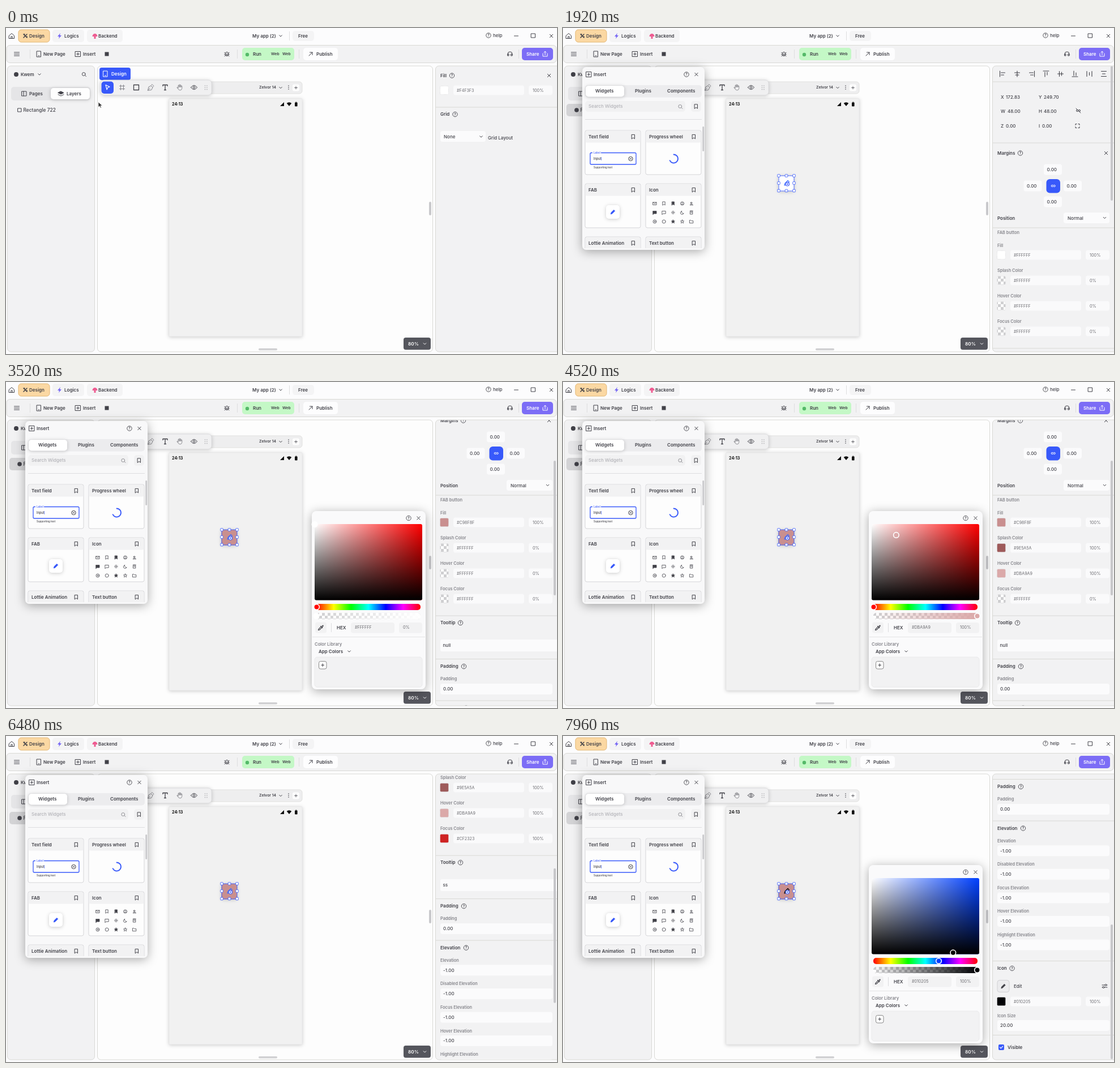
An HTML page for the animation above (8000 ms loop, 973x576 px).

```html
<!DOCTYPE html>
<html lang="en">
<head>
<meta charset="utf-8">
<title>App builder</title>
<style>
html, body { margin: 0; width: 100%; height: 100%; overflow: hidden; background: #fcfcfd; }
svg { display: block; width: 973px; height: 576px; font-family: Inter, sans-serif; }
text { white-space: pre; }
.shadow { filter: drop-shadow(0 3px 9px #0005); }
.soft { filter: drop-shadow(0 1px 3px #0003); }
</style>
</head>
<body>
<svg id="stage" viewBox="0 0 973 576"></svg>
<script>
const INK = '#414148', GREY = '#85858b', BLUE = '#3859fa', PANEL = '#f2f2f3', LINE = '#d9d9d5';

const text = (x, y, str, size = 8, color = INK, weight = 600, id = '') =>
  `<text ${id && `id="${id}"`} x="${x}" y="${y + size * .36}" font-size="${size}" fill="${color}" font-weight="${weight}">${str}</text>`;
const box = (x, y, w, h, r, fill, stroke = 'none', more = '') =>
  `<rect x="${x}" y="${y}" width="${w}" height="${h}" rx="${r}" fill="${fill}" stroke="${stroke}" ${more}/>`;
const icon = (x, y, d, color = INK, width = 1, fill = 'none') =>
  `<path transform="translate(${x} ${y})" d="${d}" fill="${fill}" stroke="${color}" stroke-width="${width}" stroke-linecap="round" stroke-linejoin="round"/>`;
const solid = (x, y, d, color = INK) => icon(x, y, d, 'none', 0, color);
const dot = (x, y, r, fill, stroke = 'none', width = 1, id = '') =>
  `<circle ${id && `id="${id}"`} cx="${x}" cy="${y}" r="${r}" fill="${fill}" stroke="${stroke}" stroke-width="${width}"/>`;
const group = (id, body, more = '') => `<g id="${id}" ${more}>${body}</g>`;
const rule = y => box(759, y - .5, 214, 1, 0, LINE);
const bar = (x, y = 46) => box(x, y - 8, 1, 16, 0, '#dddddf');
const help = (x, y) => dot(x, y, 4.2, 'none', INK, .9) + text(x - 1.8, y, '?', 6.5, INK, 600);
const cross = (x, y) => icon(x, y, 'M-2.7-2.7l5.4 5.4M2.7-2.7l-5.4 5.4');
const chevron = (x, y, color) => icon(x, y, 'M-2.3-1.2l2.3 2.3l2.3-2.3', color);

const D = {
  plus: 'M-2.4 0h4.8M0-2.4v4.8',
  plusBox: 'M-4.5-4.5h9v9h-9zM-2.3 0h4.6M0-2.3v4.6',
  phone: 'M-3.5-5h7v10h-7zM-1 3h2',
  bookmark: 'M-2.5-3.6h5v7.4l-2.5-2l-2.5 2z',
  pencil: 'M-3.5 3.5l.6-2.4l4.7-4.7l1.8 1.8l-4.7 4.7z',
  search: 'M2.7 0a2.9 2.9 0 1 0-5.8 0a2.9 2.9 0 1 0 5.8 0M2 2l2 2',
  arrow: 'M0 0v9l2.3-2l1.5 3.2l1.6-.8l-1.5-3.1h3z',
  bolt: 'M1-5l-5 6h3l-1 4l5-6h-3z',
  layers: 'M0-4l5 2.5l-5 2.5l-5-2.5zM-5 1.5l5 2.5l5-2.5',
  square: 'M-4.5-4.5h9v9h-9z',
  link: 'M-1 1.5h-1a1.5 1.5 0 0 1 0-3h1M1-1.5h1a1.5 1.5 0 0 1 0 3h-1M-1 0h2'
};

const header = () =>
  icon(10, 14, 'M-4.5-.5l4.5-4l4.5 4v5h-9zM-1.2 4.5v-3.5h2.4v3.5') +
  box(22, 3, 55, 22, 5, '#fbd8a3', '#e3b775') + icon(34, 14, 'M-3 3l6-6M-3-3l6 6M-3-3l2 0M3 3v-2', INK, 1.5) + text(41, 14, 'Design') +
  box(82, 3, 56, 22, 5, '#f4f4f5') + solid(95, 14, D.bolt, '#7465f4') + text(103, 14, 'Logics') +
  box(143, 3, 63, 22, 5, '#f4f4f5') + solid(157, 14, 'M-4.5 1a4.5 5 0 0 1 9 0zM-1.5 1h3v4h-3z', '#ee5d92') + text(163, 14, 'Backend') +
  text(435, 14, 'My app (2)') + chevron(485, 14) + bar(500, 14) +
  box(506, 5, 38, 18, 5, '#f4f4f5') + text(516, 14, 'Free') +
  help(852, 13) + text(860, 13, 'help', 8, INK, 500) +
  icon(901, 14, 'M-3.5 0h7') + icon(931, 13.5, 'M-3.5-3.5h7v7h-7z') + cross(963, 14);

const toolbar = () =>
  box(1, 30.5, 971, 31, 6, PANEL, LINE) +
  icon(19, 46, 'M-4.5-3h9M-4.5 0h9M-4.5 3h9') + bar(42) +
  icon(58, 46, D.phone) + text(66, 46, 'New Page') +
  icon(127, 46, D.plusBox) + text(136, 46, 'Insert') +
  box(174.5, 42.5, 7, 7, 0, INK) +
  icon(390, 46, 'M-2.5-1a2.5 2.5 0 0 1 5 0v2a2.5 2.5 0 0 1-5 0zM-4.2-2.5l1.7 1M4.2-2.5l-1.7 1M-4.2 0.5h1.7M4.2 .5h-1.7M-4 3.5l2-1.2M4 3.5l-2-1.2M-1 0h2M-1 1.8h2') +
  bar(408) + box(417, 35, 92, 22, 5, '#c4f8c6') + dot(426, 47, 3.2, '#55ba69') + text(436, 46, 'Run') +
  text(468, 46, 'Web', 6.8) + text(488, 46, 'Web', 6.8) + bar(517) +
  box(525, 35, 61, 22, 5, '#fdfdfe') + icon(538, 46, 'M-3 3l6-6M-1.5-3h4.5v4.5') + text(548, 46, 'Publish') +
  icon(890, 46, 'M-4 2v-2a4 4 0 0 1 8 0v2M-4 0h2v3h-2zM2 0h2v3h-2z') + bar(905) +
  box(911, 35, 55, 22, 5, '#7c6df6') + text(919, 46, 'Share', 8, '#fff') +
  icon(952, 46, 'M-4-1v5h8v-5M0 1.5v-6M-2-2.8l2-2l2 2', '#fff');

const leftPanel = () =>
  box(2.5, 67, 154, 505, 6, PANEL, LINE) + dot(18, 82, 4, INK) + text(26, 82, 'Kwem') + chevron(59, 82) + icon(137.5, 81.5, D.search) +
  box(9, 104, 140, 24, 5, '#e5e5e7') + box(79, 106, 69, 20, 5, '#fefefe', 'none', 'class="soft"') +
  icon(32, 116, 'M-4-4h8v8h-8zM-1-4v8') + text(41, 116, 'Pages') +
  icon(97, 116, D.layers) + solid(97, 116, 'M0-4l5 2.5l-5 2.5l-5-2.5z') + text(107, 116, 'Layers') +
  group('rectLayer', icon(24, 145, 'M-3-3h6v6h-6z') + text(30.5, 145, 'Rectangle 722', 8.4, INK, 500)) +
  group('fabLayer', box(6, 134, 147, 22, 5, '#d3d3d5') + dot(24, 145, 3.8, INK) + text(30.5, 145, 'FAB', 8.4, INK, 500));

const workspace = () =>
  box(161.5, 67, 592, 505, 6, '#fdfdfd', LINE) +
  box(288, 95, 235, 21, 5, '#eeeeef', '#e1e1df') + text(447, 105, 'Zelvor 14', 6.8) + chevron(485, 105.5) +
  [-3, 0, 3].map(d => dot(499, 105 + d, .8, INK)).join('') + box(506, 99.5, 12, 12, 3, '#fdfdfd') + icon(512, 105.5, D.plus, INK, .8) +
  box(288, 125, 235, 420, 1, '#f1f1f1', '#e3e3e5', 'class="soft" stroke-width=".6"') +
  text(293, 134, '24:13', 7.2, '#111', 700) + solid(488, 134.5, 'M-4 3.5h7v-7z', '#111') +
  solid(500, 134.5, 'M-4.3-1.5a6.2 6.2 0 0 1 8.6 0l-4.3 5z', '#111') + box(510, 131.5, 4.6, 7, 1, '#111') + box(511.2, 130.6, 2.2, 1, 0, '#111') +
  box(165, 70, 55, 22, 4, BLUE) + icon(175.5, 81, D.phone, '#fff') + text(186, 81, 'Design', 8, '#fff') +
  box(167, 92, 196, 26.5, 6, '#f0f0f1', '#dddddf', 'class="soft"') + box(168.5, 94.5, 21.5, 21.5, 5, BLUE) +
  icon(176, 100.5, 'M0 0l7 3.5l-3.4 1.3l-1.5 3.6z', '#fff', 1.2) +
  icon(205, 105, 'M-2.5-4.5v9M2.5-4.5v9M-4.5-2.5h9M-4.5 2.5h9', GREY) + icon(230, 105, D.square, INK, 1.3) +
  icon(255.5, 105, 'M-5 5l1.5-6l4-2l3 3l-2 4zM1-4l1.5-1.5l3 3l-1.5 1.5M-5 5l4-4', GREY) +
  icon(281, 105, 'M-4-2.5v-2h8v2M0-4.5v9M-1.5 4.5h3', INK, 1.3) +
  icon(306.5, 105, 'M-2.5 1v-4.5q1-1 1.7 0v3v-4.2q1-1 1.7 0v4.2v-3.5q1-1 1.7 0v3.5v-2q1-1 1.7 0v4q-.5 3.5-3.5 3.5q-2.5 0-5.5-5q.7-1.2 2.2 1', GREY, .9) +
  icon(332, 105, 'M-5.5 0q5.5-7.5 11 0q-5.5 7.5-11 0M1.8 0a1.8 1.8 0 1 0-3.6 0a1.8 1.8 0 1 0 3.6 0') +
  [0, 1, 2, 3, 4, 5].map(i => dot(351.5 + i % 2 * 3.4, 102 + (i >> 1) * 3.3, .8, '#a5a5a9')).join('') +
  box(747, 307, 4, 24, 2, '#c9c9cc') + box(446, 566, 33, 3.5, 1.7, '#d0d0d2') +
  box(702, 547, 48, 21.5, 4, '#55565d') + text(710, 558, '80%', 8.2, '#fff') + chevron(739.5, 558, '#fff');

const pen = color => `<g id="fabIcon" stroke="${BLUE}">${icon(395, 274, 'M-4 4l1-3.5l5-5l2.4 2.4l-5 5z', 'inherit', 1.2).replace('stroke="inherit"', '')}</g>`;
const fab = () => {
  let out = box(380.5, 261, 27.5, 27.5, 3, '#fff', 'none', 'id="fabFill" class="soft"') + pen() +
    dot(396.3, 275.8, 3.2, '#fff', BLUE, 1.2) + dot(396.3, 275.8, 1.2, BLUE) + box(381, 261, 27, 27, 0, 'none', BLUE, 'stroke-width=".9"');
  for (const x of [381, 394.5, 408]) for (const y of [261, 274, 287.5])
    if (x !== 394.5 || y !== 274) out += box(x - 2.3, y - 2.3, 4.6, 4.6, .6, '#fff', BLUE, 'stroke-width=".8"');
  return out;
};

const card = (x, y, title) =>
  box(x, y, 98, 78, 3, '#fdfdfd', '#d5d5d8') + box(x + .5, y + .5, 97, 21, 3, PANEL) +
  text(x + 6, y + 11, title, 8) + icon(x + 85, y + 11, D.bookmark);

const smallIcons = () => {
  const shapes = ['M-3-2h6v4.5h-6zM-3-2l3 2.5l3-2.5', 'M-2-3h4v6l-2-1.6l-2 1.6z', 'M-2-3h4v6l-2-1.6l-2 1.6z', 'M3 0a3 3 0 1 0-6 0a3 3 0 1 0 6 0M-2 2q2-2 4 0M-1-1h2', 'M-2.5 2.5q2.5-3 5 0zM-1-2h2v2h-2z',
    'M-3-2.5h6v4.5h-4.5l-1.5 1.5z', 'M-3-2.5h6v4.5h-4.5l-1.5 1.5z', 'M1.4 0a1.4 1.4 0 1 0-2.8 0a1.4 1.4 0 1 0 2.8 0M0-3v.4M0 3v-.4M-3 0h.4M3 0h-.4M-2-2l.2.2M2 2l-.2-.2M-2 2l.2-.2M2-2l-.2.2', 'M-1-2.5a3 3 0 1 0 3.5 4a3 3 0 0 1-3.5-4', 'M-2-2h4v5h-4zM-2.5-3h5M-1 0h2',
    'M3 0a3 3 0 1 0-6 0a3 3 0 1 0 6 0M1 0a1 1 0 1 0-2 0a1 1 0 1 0 2 0', 'M3 0a3 3 0 1 0-6 0a3 3 0 1 0 6 0', 'M0-3l.9 2h2.1l-1.6 1.5l.6 2.3l-2-1.3l-2 1.3l.6-2.3l-1.6-1.5h2.1z', 'M0-3l.9 2h2.1l-1.6 1.5l.6 2.3l-2-1.3l-2 1.3l.6-2.3l-1.6-1.5h2.1z', 'M-3-2.3h2l1 1h3v4h-6z'];
  return shapes.map((d, i) => icon(162 + i % 5 * 16.2, 310 + Math.floor(i / 5) * 16, d, INK, .8, [2, 5, 12].includes(i) ? INK : 'none')).join('');
};

const insertPanel = () =>
  box(34, 69, 216, 323, 7, '#f8f8f9', 'none', 'class="shadow"') +
  icon(45.5, 82, D.plusBox) + text(54, 82, 'Insert') + help(218, 82) + cross(235.5, 82) +
  box(39, 101, 206, 21.5, 5, '#ececee') + box(40, 102, 68, 19.5, 5, '#fff', 'none', 'class="soft"') +
  text(57, 111.5, 'Widgets', 8.1) + text(127, 111.5, 'Plugins', 8.1) + text(184, 111.5, 'Components', 8) +
  box(39, 129, 177, 19, 5, '#f1f1f2') + text(45, 138.5, 'Search Widgets', 8, '#b2b2b7', 500) + icon(207, 138.5, D.search, GREY, .9) +
  box(226, 129, 18, 19, 5, '#f1f1f2') + icon(235, 138.5, D.bookmark) + box(39, 161, 206, 1, 0, '#dedee0') +
  `<g clip-path="url(#insertClip)">` +
  card(39, 181, 'Text field') + card(146, 181, 'Progress wheel') + card(39, 275, 'FAB') + card(146, 275, 'Icon') +
  card(39, 369, 'Lottie Animation') + card(146, 369, 'Text button') + '</g>' +
  box(48, 220.5, 81, 20.5, 2, '#fefefe', BLUE, 'stroke-width="1.3"') + box(52, 218, 15, 4, 0, '#fefefe') + text(54, 220, 'Label', 4.6, BLUE, 500) +
  text(54, 231, 'Input', 5.5, INK, 500) + box(67.5, 228, .6, 6, 0, BLUE) + dot(119.5, 231, 3.7, 'none', INK) + icon(119.5, 231, 'M-1.4-1.4l2.8 2.8M1.4-1.4l-2.8 2.8', INK, .9) +
  text(54, 246, 'Supporting text', 4.5, INK, 500) +
  icon(195.5, 231, 'M0-7.5a7.5 7.5 0 1 1-6.8 10.7', BLUE, 1.9) +
  box(76, 313, 24, 24, 5, '#fff', 'none', 'class="soft"') + icon(88, 325, D.pencil, BLUE, 1, BLUE) + smallIcons() +
  box(246.3, 174, 2.8, 44, 1.4, '#c8c8cb');

const colorRow = (y, id, hex = '#FFFFFF', pct = '0%') =>
  box(766.5, y - 7.5, 15, 15, 2, 'url(#checker)') + box(766.5, y - 7.5, 15, 15, 2, '#fff', '#e0e0e2', `id="${id}Swatch" stroke-width=".5"`) +
  box(790, y - 8.5, 125, 17, 4, '#fafafb') + text(796, y, hex, 7.1, '#6b6b70', 400, id + 'Hex') +
  box(923, y - 8.5, 42, 17, 4, '#fafafb') + text(930, y, pct, 7.3, '#6b6b70', 400, id + 'Pct');
const label = (y, str) => text(767, y, str, 7.4, GREY, 600);
const heading = (y, str, helpX) => text(767, y, str) + help(helpX, y);
const field = (y, str, id) => box(767, y - 9.5, 198, 19, 4, '#fbfbfc') + text(772, y, str, 8, INK, 500, id);
const margin = (x, y) => box(x - 16, y - 9.5, 32, 19, 4, '#fbfbfc') + text(x - 10.5, y, '0.00', 8, INK, 500);

const aligns = ['M-5-5v10M-3-2h7M-3 2h5', 'M0-5v10M-4.5-2h9M-3 2h6', 'M5-5v10M3-2h-7M3 2h-5', 'M-5-5h10M-2-3v8M2-3v5',
  'M-5 0h10M-2-4.5v9M2-3v6', 'M-5 5h10M-2 3v-8M2 3v-5', 'M-4.5-4.5v9M4.5-4.5v9M0-2.5v5', 'M-4.5-4.5h9M-4.5 4.5h9M-2.5 0h5'];

const widgetPanel = () =>
  aligns.map((d, i) => icon(776.5 + i * 25.5, 81, d, INK, 1.1)).join('') + rule(95) +
  [['X', '172.83', 'Y', '249.70'], ['W', '48.00', 'H', '48.00'], ['Z', '0.00', 'I', '0.00']].map((r, i) => {
    const y = 122 + i * 25.4, at = i === 1 ? [773, 785, 840, 849] : [773, 782, 840, i ? 846 : 849];
    return r.map((s, k) => text(at[k], y, s, 8, INK, 500)).join('');
  }).join('') +
  icon(910, 146, D.link + 'M-4-4l8 8', INK, 1) + icon(908.5, 173, 'M-3.5-1.5v-2h2M1.5-3.5h2v2M3.5 1.5v2h-2M-1.5 3.5h-2v-2') +
  rule(203) + heading(221, 'Margins', 807.5) + cross(959, 221) +
  margin(865, 250) + margin(829.5, 279) + margin(900, 279) + margin(865, 307) + box(853.5, 267, 24.5, 24.5, 6, BLUE) + icon(865.7, 279, D.link, '#fff') +
  text(767, 336, 'Position') + box(884, 326, 81, 19, 4, '#fbfbfc') + text(891, 336, 'Normal', 8, INK, 500) + chevron(956.5, 335.5) +
  rule(353) + label(361.5, 'FAB button') +
  ['Fill', 'Splash', 'Hover', 'Focus'].map((n, i) =>
    label(384 + i * 44.7, n + (i ? ' Color' : '')) + colorRow(401 + i * 45, n, '#FFFFFF', i ? '0%' : '100%')).join('') +
  rule(566) + heading(578.5, 'Tooltip', 802.5) +
  box(767, 608, 220, 21, 3, '#fbfbfc', 'none', 'id="tipField" stroke-width=".8"') + box(771, 612.5, 15, 11, 0, '#b9b9bb', 'none', 'id="tipMark"') + text(771.5, 618, 'null', 8, INK, 500, 'tip') +
  rule(642.5) + heading(655.5, 'Padding', 808.5) + label(677.5, 'Padding') + field(695.5, '0.00') +
  rule(716) + heading(729, 'Elevation', 812.5) +
  ['', 'Disabled ', 'Focus ', 'Hover ', 'Highlight '].map((n, i) => label(751 + i * 41.6, n + 'Elevation') + field(768.7 + i * 41.6, '-1.00')).join('') +
  rule(963.5) + heading(976.5, 'Icon', 793) + box(767, 997.5, 21, 21, 4, '#ececee', '#d0d0d3') + icon(777.5, 1008, D.pencil, INK, 1, INK) + text(796, 1008, 'Edit', 8, INK, 500) +
  icon(956.5, 1008, 'M-4.5-2h5M3.5-2h1M-4.5 2h1M-.5 2h5M3.5-2a1.5 1.5 0 1 0-3 0a1.5 1.5 0 1 0 3 0M-.5 2a1.5 1.5 0 1 0-3 0a1.5 1.5 0 1 0 3 0') +
  colorRow(1035, 'Icon') + label(1060, 'Icon Size') + field(1077.5, '20.00') + rule(1094.5) +
  box(769, 1111, 10, 10, 2, BLUE) + icon(774, 1116, 'M-2.5 0l1.8 1.8l3.3-3.6', '#fff', 1.2) + text(785, 1116, 'Visible');

const pagePanel = () =>
  heading(84, 'Fill', 787.5) + cross(959, 84) + colorRow(110, 'Page', '#F4F3F3', '100%') + rule(140) + heading(152.5, 'Grid', 793) +
  box(767, 182, 80, 19, 4, '#fbfbfc') + text(773, 192, 'None', 8, INK, 500) + chevron(839, 192) + text(851, 194, 'Grid Layout', 8, INK, 500);

const picker = () =>
  box(540, 228, 201, 315, 8, '#fafafb', 'none', 'class="shadow"') + help(711, 240.5) + cross(728.5, 240.5) +
  box(545, 251, 190, 134.5, 3, 'url(#tone)') + box(545, 251, 190, 134.5, 3, 'url(#shade)') +
  box(548, 392, 184, 11, 5, 'url(#hues)') + box(548, 408, 184, 11, 5, 'url(#checker)') + box(548, 408, 184, 11, 5, 'url(#fade)') +
  ['toneKnob', 'hueKnob', 'alphaKnob'].map(id => dot(0, 0, 4.8, '#fff', '#fff', 1.6, id)).join('') +
  box(546, 424.5, 20, 19, 4, PANEL) + icon(556, 434, 'M-4.5 4.5l.6-2l4.4-4.4l1.5 1.5l-4.4 4.4zM-.5-2.7l3.2 3.2M1-1.5l1.7-1.9q1.2-1 1.6.2l-1.8 2.6', INK, 1.1) +
  bar(574, 434) + text(584, 434, 'HEX') + box(609, 425, 77, 18.5, 4, PANEL) + text(616, 433.5, '', 7.1, '#6b6b70', 400, 'pickHex') +
  box(694, 425, 41, 18.5, 4, PANEL) + text(701, 433.5, '', 7.3, '#6b6b70', 400, 'pickPct') + box(541, 450, 199, 1, 0, '#e4e4e6') +
  text(545, 463.5, 'Color Library', 7.7, GREY) + text(552, 476, 'App Colors') + chevron(606, 476) +
  box(545, 486, 190, 53, 5, PANEL, '#e9e9eb') + box(552.5, 493.5, 13.5, 13.5, 3, '#fdfdfd', '#888') + icon(559.2, 500.2, D.plus);

const stops = list => list.map((c, i) => `<stop offset="${i / (list.length - 1)}" stop-color="${c}"/>`).join('');
const $ = id => document.getElementById(id);

$('stage').innerHTML = `<defs>
  <pattern id="checker" width="10" height="10" patternUnits="userSpaceOnUse" x="548" y="408"><path d="M0 0h10v10h-10z" fill="#fff"/><path d="M0 0h5v5h-5zM5 5h5v5h-5z" fill="#cfcfd1"/></pattern>
  <linearGradient id="tone"><stop stop-color="#fff"/><stop id="pure" offset="1"/></linearGradient>
  <linearGradient id="shade" x2="0" y2="1"><stop stop-opacity="0"/><stop offset="1"/></linearGradient>
  <linearGradient id="hues">${stops(['red', 'yellow', 'lime', 'cyan', 'blue', 'magenta', 'red'])}</linearGradient>
  <linearGradient id="fade"><stop id="fadeStart" stop-opacity="0"/><stop id="fadeEnd" offset="1"/></linearGradient>
  <clipPath id="sideClip">${box(759, 67.5, 214, 504, 0, '#000')}</clipPath>
  <clipPath id="insertClip">${box(34, 163, 216, 226, 0, '#000')}</clipPath></defs>` +
  box(0, 0, 973, 576, 0, '#fcfcfd') + header() + toolbar() + leftPanel() + workspace() + group('fab', fab()) +
  box(758.5, 67, 222, 505, 6, PANEL, LINE) + group('pagePanel', pagePanel()) +
  `<g id="widgetPanel" clip-path="url(#sideClip)">${group('scroller', widgetPanel())}${box(967, 67, 4, 238, 2, '#c6c6c9', 'none', 'id="thumb"')}</g>` +
  group('insert', insertPanel()) + group('picker', picker()) +
  group('cursor', icon(0, 0, D.arrow, '#fff', .7, '#333'));

const DURATION = 8000;
// Value at time t along [time, value] keys, eased between neighbours.
const track = (keys, t) => {
  let [t0, v0] = keys[0];
  for (const [t1, v1] of keys) {
    if (t < t1) {
      const p = (t - t0) / (t1 - t0);
      return v0 + (v1 - v0) * p * p * (3 - 2 * p);
    }
    [t0, v0] = [t1, v1];
  }
  return v0;
};
const scrollKeys = [[0, 0], [2040, 0], [2320, 153], [5200, 153], [5440, 268], [6200, 268], [6800, 460], [7120, 460], [7360, 566]];
const cursorX = [[0, 163], [320, 146], [480, 146], [800, 88], [920, 88], [1440, 395]];
const cursorY = [[0, 131], [320, 46], [480, 46], [800, 325], [920, 325], [1440, 274]];

const edits = [
  { id: 'Fill', open: 2480, close: 3200, drag: [2600, 3080], hue: 0, from: [0, 1], to: [58 / 201, 201 / 255], alpha: 1 },
  { id: 'Splash', open: 3440, close: 3960, drag: [3560, 3760], hue: 0, from: [0, 1], to: [68 / 158, 158 / 255], alpha: 0 },
  { id: 'Hover', open: 4000, close: 4560, drag: [4120, 4320], hue: 0, from: [0, 1], to: [50 / 219, 219 / 255], alpha: 0 },
  { id: 'Focus', open: 4600, close: 5160, drag: [4720, 4920], hue: 0, from: [0, 1], to: [172 / 207, 207 / 255], alpha: 0 },
  { id: 'Icon', open: 7440, close: DURATION, drag: [7560, 7880], hue: 225, from: [.757, 1], to: [.757, 5 / 255], alpha: 1 }
];

const hex = (h, s, v) => '#' + [5, 3, 1].map(n => {
  const k = (n + h / 60) % 6;
  return Math.round(255 * v * (1 - s * Math.max(0, Math.min(k, 4 - k, 1)))).toString(16).padStart(2, '0');
}).join('').toUpperCase();
const set = (id, attrs) => { for (const k in attrs) $(id).setAttribute(k, attrs[k]); };
const show = (id, on) => set(id, { visibility: on ? 'visible' : 'hidden' });

function drawPicker({ hue }, s, v, a, color, pct) {
  set('pure', { 'stop-color': hex(hue, 1, 1) });
  set('fadeStart', { 'stop-color': color });
  set('fadeEnd', { 'stop-color': color });
  set('toneKnob', { cx: 545 + 190 * s, cy: 251.5 + 134 * (1 - v), fill: color });
  set('hueKnob', { cx: 548.5 + 184 * hue / 360, cy: 397.5, fill: hex(hue, 1, 1) });
  set('alphaKnob', { cx: 548 + 183.5 * a, cy: 413.5, fill: a ? color : '#fff' });
  $('pickHex').textContent = color;
  $('pickPct').textContent = pct;
}

function render(t) {
  const placed = t >= 1480;
  show('cursor', t < 1600);
  set('cursor', { transform: `translate(${track(cursorX, t)} ${track(cursorY, t)})` });
  show('insert', t >= 440);
  for (const id of ['fab', 'fabLayer', 'widgetPanel']) show(id, placed);
  for (const id of ['rectLayer', 'pagePanel']) show(id, !placed);

  const y = track(scrollKeys, t);
  set('scroller', { transform: `translate(0 ${-y})` });
  set('thumb', { y: 67 + y * .47 });

  let picking = false;
  for (const e of edits) {
    const p = track([[e.drag[0], 0], [e.drag[1], 1]], Math.max(t, e.drag[0]));
    const [s, v] = e.from.map((f, i) => f + (e.to[i] - f) * p);
    const a = e.alpha || track([[0, 0], [e.drag[1] + 20, 0], [e.drag[1] + 160, 1]], t);
    const color = hex(e.hue, s, v), pct = Math.round(a * 100) + '%';
    set(e.id + 'Swatch', { fill: color, 'fill-opacity': a });
    $(e.id + 'Hex').textContent = color;
    $(e.id + 'Pct').textContent = pct;
    if (e.id === 'Fill') set('fabFill', { fill: color });
    if (e.id === 'Icon') set('fabIcon', { stroke: color });
    if (t >= e.open && t < e.close) {
      picking = true;
      drawPicker(e, s, v, a, color, pct);
    }
  }
  show('picker', picking);
  set('tipField', { stroke: t >= 5480 && t < 6160 ? '#c4c4c7' : 'none' });
  set('tipMark', { opacity: t >= 5480 && t < 5760 ? 1 : 0 });
  $('tip').textContent = t < 5760 ? 'null' : t < 5880 ? 's' : 'ss';
}

const start = performance.now();
function frame() {
  render((performance.now() - start) % DURATION);
  requestAnimationFrame(frame);
}
frame();
</script>
</body>
</html>
```
